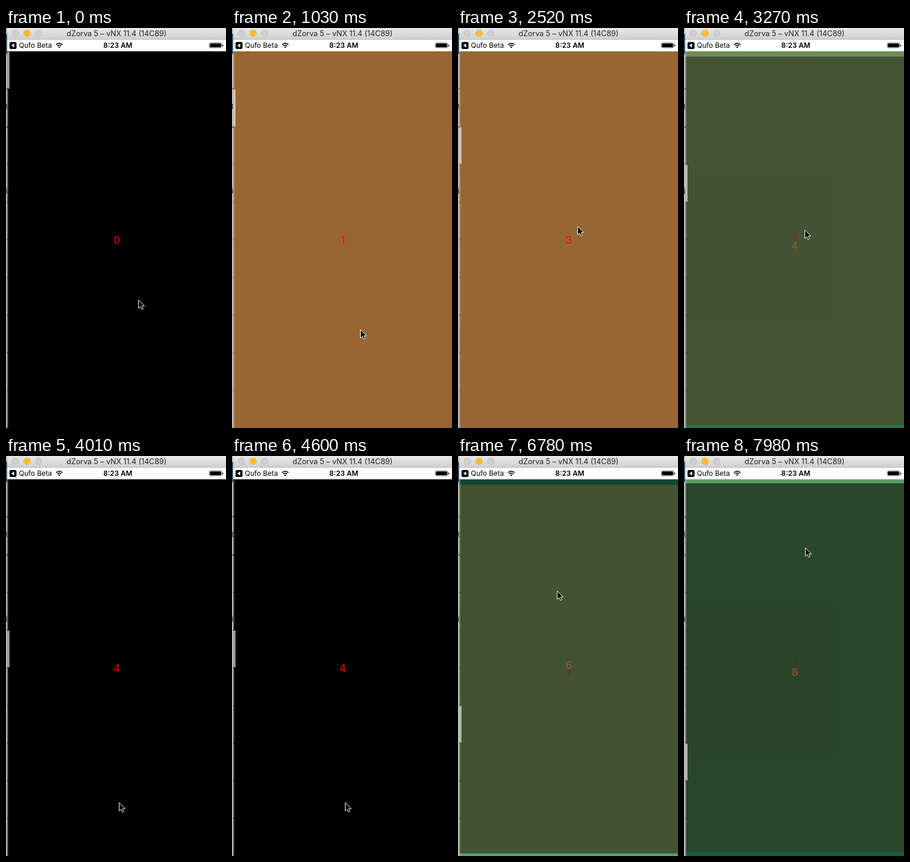
An HTML page for the animation above (8000 ms loop, 376 px wide and 686 px high).

```html
<!DOCTYPE html>
<html lang="en">
<head>
<meta charset="utf-8">
<title>Vertical pager</title>
<style>
  html, body { margin: 0; width: 376px; height: 686px; overflow: hidden; background: #bcbcbc; }
  svg { display: block; font-family: Inter, Roboto, sans-serif; }
  .num { font-size: 17.5px; fill: #f00; text-anchor: middle; }
</style>
</head>
<body>
<svg width="376" height="686" viewBox="0 0 376 686">
  <defs>
    <linearGradient id="bar" x2="0" y2="1">
      <stop stop-color="#e9e8e9"/><stop offset="1" stop-color="#d0cfd0"/>
    </linearGradient>
    <clipPath id="screen"><rect x="2" y="40" width="374" height="646"/></clipPath>
  </defs>

  <!-- sliver of the window behind -->
  <rect width="2" height="686" fill="#bcbcbc"/>
  <rect y="10" width="2" height="35" fill="#2a5d8c"/>
  <path d="M0 103.500h2M0 169.500l2 1M1.500 130q-2 5 0 9M1 277v7M1 274v1.500" fill="none" stroke="#222" stroke-width="1.200"/>

  <!-- title bar -->
  <rect x="2" width="374" height="20" fill="url(#bar)"/>
  <path d="M2 19.500h374" stroke="#b9b8b9"/>
  <g stroke-width=".8">
    <circle cx="16" cy="9" r="5.600" fill="#d0cfd0" stroke="#bcbbbc"/>
    <circle cx="36" cy="9" r="5.600" fill="#ffbd2e" stroke="#e1a325"/>
    <circle cx="56" cy="9" r="5.600" fill="#d0cfd0" stroke="#bcbbbc"/>
  </g>
  <text x="189" y="14" font-size="12.800" text-anchor="middle" fill="#222">dZorva 5 – vNX 11.4 (14C89)</text>

  <!-- status bar -->
  <rect x="2" y="20" width="374" height="20" fill="#fff"/>
  <rect x="6" y="24" width="12" height="12" rx="2.500"/>
  <path d="M14 26.500v7l-5-3.500z" fill="#fff"/>
  <text x="22" y="34.300" font-size="12">Qufo Beta</text>
  <g fill="none" stroke="#000" stroke-width="1.600">
    <path d="M85.500 28.600q5.500-4.800 11 0M87.600 30.900q3.400-3 6.800 0"/>
    <path d="M91 34.500l-1.900-2q1.900-1.600 3.800 0z" fill="#000" stroke="none"/>
  </g>
  <text x="191" y="34.300" font-size="12" font-weight="600" text-anchor="middle">8:23 AM</text>
  <rect x="347.500" y="25.500" width="21" height="8.500" rx="2" fill="none" stroke="#555" stroke-width=".8"/>
  <rect x="348.500" y="26.500" width="19" height="6.500" rx="1"/>
  <path d="M369.500 28.300q2 .5 2 1.700t-2 1.700z"/>

  <g clip-path="url(#screen)">
    <rect x="2" y="40" width="374" height="647" fill="#2ec88a"/>
    <g id="pages"></g>
    <g id="marks" fill="#fff"></g>
  </g>
  <path id="cursor" d="M.5 .5V14.800L3.800 11.700 6 16.700 8.500 15.600 6.400 10.800H10.900Z" stroke="#fff" stroke-linejoin="round"/>
</svg>
<script>
const LOOP = 8000, TICK = 147.8, COUNT = 10;
const SHIFT = 15;                            // page travel in px
const TURN = 700, RISE = 525, RETURN = 500;  // ms
const LEAN = 27;                             // sideways drift of a swipe in px

// one entry per page turn: start time, pointer x, lowest and highest pointer y
const swipes = [
  { at: 200, x: 226, low: 466, high: 140 },
  { at: 1060, x: 218, low: 523, high: 180 },
  { at: 1855, x: 180, low: 500, high: 288 },
  { at: 2950, x: 190, low: 590, high: 190 },
  { at: 4757, x: 193, low: 594, high: 87 },
  { at: 5600, x: 190, low: 460, high: 190 },
  { at: 6515, x: 154, low: 450, high: 60 },
  { at: 7608, x: 185, low: 541, high: 60 }
];

const $ = id => document.getElementById(id);
const mix = (a, b, f) => a + (b - a) * f;

function ease(u) {
  u = Math.min(1, Math.max(0, u));
  return u * u * (3 - 2 * u);
}

function make(parent, tag, attrs, text = "") {
  const el = document.createElementNS("http://www.w3.org/2000/svg", tag);
  for (const key in attrs) el.setAttribute(key, attrs[key]);
  el.textContent = text;
  return parent.appendChild(el);
}

const pages = [], marks = [];
for (let i = 0; i < COUNT; i++) {
  const page = make($("pages"), "g", {});
  make(page, "rect", { x: 2, y: 40, width: 374, height: 647, fill: i % 2 ? "#996633" : "#000" });
  make(page, "text", { class: "num", x: 189.5, y: 370 }, i);
  pages.push(page);
  marks.push(make($("marks"), "rect", { x: 2, y: 41 + 64.6 * i, height: 63 }));
}

const scrollAt = t => swipes.reduce((sum, s) => sum + ease((t - s.at) / TURN), 0);

// The pointer rises with a swipe, then goes back down to where the next one begins.
function pointerAt(t) {
  const i = Math.max(0, swipes.findLastIndex(s => s.at <= t));
  const s = swipes[i], next = swipes[i + 1] || s;
  const top = s.at + RISE;
  const up = ease((t - s.at) / RISE);
  const back = ease((t - top) / Math.min(RETURN, Math.abs(next.at - top)));
  return [
    mix(s.x + LEAN * up, next.x, back),
    mix(mix(s.low, s.high, up), next.low, back)
  ].map(Math.round);
}

function draw(time) {
  const t = Math.floor(time / TICK + .15) * TICK;
  const pos = scrollAt(t);
  pages.forEach((page, i) => {
    const gap = i - pos;
    page.setAttribute("opacity", Math.max(0, 1 - Math.abs(gap)));
    page.setAttribute("transform", `translate(0 ${gap * SHIFT})`);
  });
  marks.forEach((mark, i) => {
    const on = i === Math.floor(pos);
    mark.setAttribute("width", on ? 4 : 2);
    mark.setAttribute("opacity", on ? .6 : .3);
  });
  const [x, y] = pointerAt(t);
  $("cursor").setAttribute("transform", `translate(${x} ${y})`);
}

const start = performance.now();
function frame() {
  draw((performance.now() - start) % LOOP);
  requestAnimationFrame(frame);
}
frame();
</script>
</body>
</html>
```
